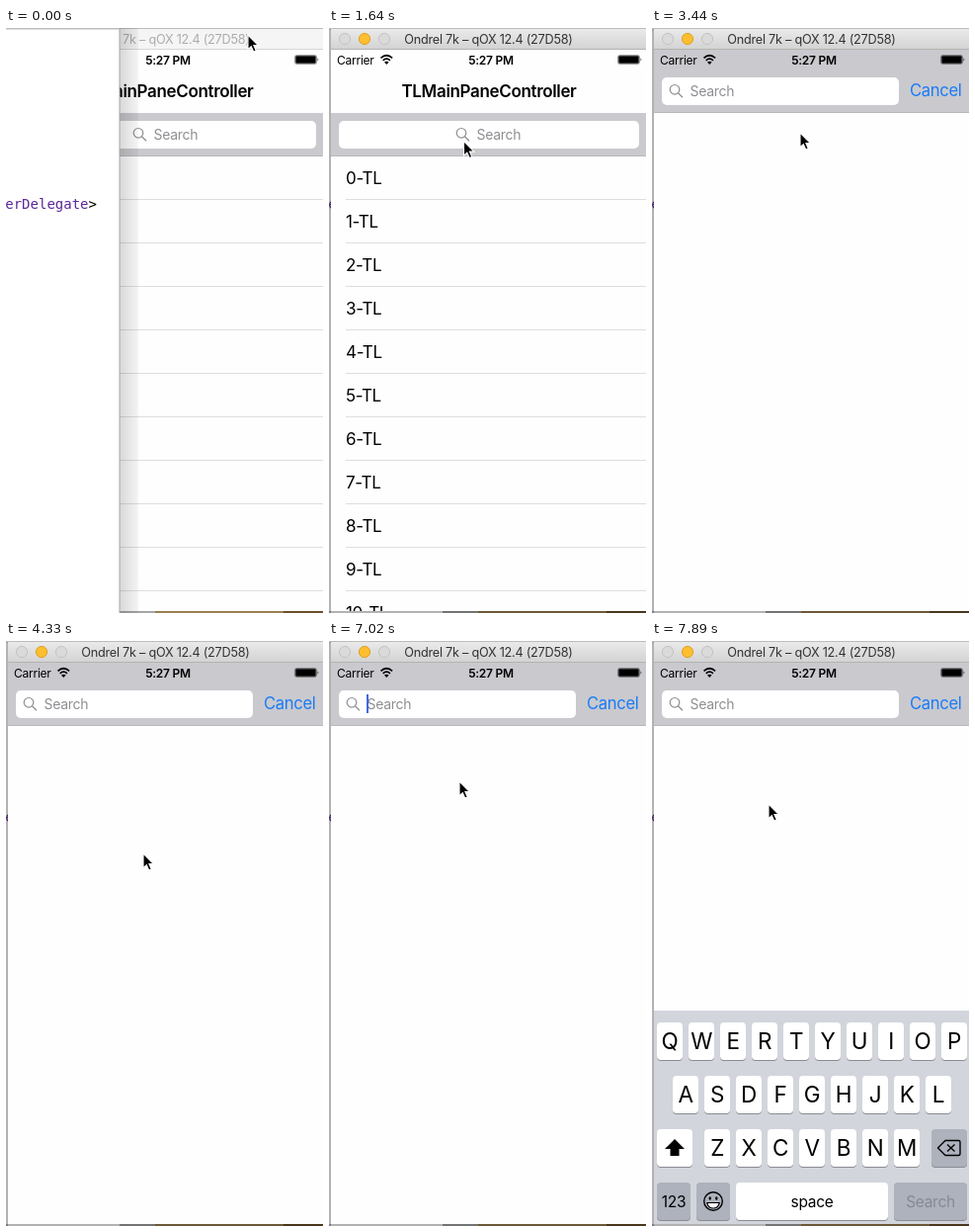
Write an HTML page that moves like this. It is 321 by 592 pixels and loops after 8 s.

```html
<!DOCTYPE html>
<html lang="en">
<head>
<meta charset="utf-8">
<title>Search bar</title>
<style>
  html, body { margin: 0; width: 100%; height: 100%; overflow: hidden; background: #fff; }
  svg { display: block; width: 321px; height: 592px; }
  text { font-family: Inter, Roboto, sans-serif; letter-spacing: -.02em; }
  .mid { text-anchor: middle; }
  .code { font: 14px "DejaVu Sans Mono", monospace; letter-spacing: 0; text-anchor: end; }
</style>
</head>
<body>
<svg viewBox="0 0 321 592" xmlns="http://www.w3.org/2000/svg">
  <defs>
    <linearGradient id="chrome" x2="0" y2="1">
      <stop stop-color="#ebebeb"/><stop offset="1" stop-color="#d2d2d2"/>
    </linearGradient>
    <linearGradient id="shade">
      <stop stop-opacity=".15"/><stop offset="1" stop-opacity=".04"/>
    </linearGradient>
    <clipPath id="screen"><rect x="2" y="22" width="319" height="568"/></clipPath>
    <g id="editor">
      <rect width="115" height="592" fill="#fff"/>
      <rect width="115" height="1.5" fill="#bdbdbd"/>
      <text class="code" x="92" y="183" fill="#5c2699">erDelegate<tspan fill="#000">&gt;</tspan></text>
    </g>
  </defs>

  <rect width="321" height="592" fill="#a6a6a6"/>
  <rect x="151" y="588" width="130" height="4" fill="#9c7f4f"/>
  <rect x="281" y="588" width="40" height="4" fill="#6a4f2c"/>
  <g id="behind">
    <use href="#editor"/>
    <rect width="2" height="592" opacity=".3"/>
    <rect y="590" width="321" height="2" opacity=".3"/>
  </g>

  <g clip-path="url(#screen)">
    <rect x="2" y="22" width="319" height="568" fill="#fefefe"/>
    <g id="list"></g>
    <text id="heading" class="mid" x="162" font-size="17" font-weight="600">TLMainPaneController</text>
    <rect id="bar" x="2" width="319" fill="#c9c9ce"/>
    <rect id="barLine" x="2" width="319" height="1" fill="#b7b7bc"/>
    <rect id="field" x="10" height="28" rx="5" fill="#fff"/>
    <g id="hint" fill="#8e8e93">
      <g fill="none" stroke="#8e8e93" stroke-width="1.2">
        <circle cx="6" cy="12.3" r="4.8"/><path d="M9.5 15.8L14 20.2"/>
      </g>
      <text x="21.5" y="19" font-size="14">Search</text>
    </g>
    <text id="cancel" x="261" y="69" font-size="16.6" fill="#1a7bf6">Cancel</text>
    <rect id="caret" x="38" y="54" width="2" height="19" fill="#4169e1"/>
    <g id="status">
      <text x="8" y="36.5" font-size="12">Carrier</text>
      <path d="M52.5 30.3Q58.3 25.2 64.1 30.3M54.7 32.8Q58.3 29.6 61.9 32.8" fill="none" stroke="#000" stroke-width="1.7"/>
      <path d="M58.3 37L56 34.6Q58.3 32.8 60.6 34.6Z"/>
      <text class="mid" x="164" y="36.5" font-size="12" font-weight="600">5:27 PM</text>
      <rect x="292.5" y="27.5" width="22" height="9" rx="2" fill="none" stroke="#000" stroke-opacity=".4"/>
      <rect x="293.3" y="28.3" width="20.4" height="7.4" rx="1"/>
      <path d="M315.6 30.3q1.5 1.7 0 3.4z"/>
    </g>
    <g id="keyboard"><rect x="2" width="319" height="216" fill="#d2d5db"/></g>
  </g>

  <rect id="titleBar" x="2" width="319" height="22"/>
  <rect id="titleEdge" x="2" y="21" width="319" height="1"/>
  <rect width="321" height="1" fill="#bcbcbc"/>
  <g stroke="#c3c3c3" fill="#dadada">
    <circle cx="16" cy="11" r="5.6"/>
    <circle cx="36" cy="11" r="5.6" fill="#fdbe2f" stroke="#dfa023"/>
    <circle cx="56" cy="11" r="5.6"/>
  </g>
  <text id="device" class="mid" x="161.5" y="15.8" font-size="12.7">Ondrel 7k – qOX 12.4 (27D58)</text>

  <g id="front">
    <use href="#editor"/>
    <rect x="115" width="19" height="592" fill="url(#shade)"/>
    <rect x="114.5" width="1" height="592" fill="#a8a8a8"/>
  </g>
  <path id="pointer" d="M0 0V14.6L3.3 11.6L5.7 17L8.2 15.9L5.9 10.6H10.4Z" stroke="#fff" stroke-width="1.1"/>
</svg>

<script>
const LOOP = 8000, TICK = 148.8;

const POINTER = [
  [6, 245, 7], [7, 243, 25], [8, 226, 110], [9, 195, 188], [10, 152, 142], [11, 136.5, 114.5],
  [18, 136.5, 114.5], [20, 152, 106], [21, 152, 106], [22, 150, 106], [23, 150, 106],
  [24, 152, 140], [26, 161, 310], [27, 156, 346], [29, 139, 215], [30, 135, 170], [31, 134, 158],
  [46, 134, 158], [47, 132, 142], [49, 113, 91], [50, 111, 88], [51, 112, 105], [53, 118, 165]
];
const CARET = [
  [0, 0], [24, 1], [27, .5], [28, 0], [30, 1], [33, .5], [34, 0], [37, 1],
  [40, .5], [41, 0], [43, .5], [44, 1], [52, .5], [53, 0]
];

const $ = id => document.getElementById(id);
const set = (id, attrs) => {
  for (const name in attrs) $(id).setAttribute(name, attrs[name]);
};
const show = (id, on) => set(id, { display: on ? "inline" : "none" });
const move = (id, x, y) => set(id, { transform: `translate(${x} ${y})` });
const mix = (a, b, p) => a + (b - a) * p;

function buildList() {
  let rows = "";
  for (let i = 0; i < 11; i++) {
    const y = 130 + 44 * i;
    rows += `<text x="17" y="${y + 28}" font-size="17">${i}-TL</text>
      <rect x="17" y="${y + 43}" width="304" height="1" fill="#dededf"/>`;
  }
  $("list").innerHTML = rows;
}

function key(x, y, width, label = "", size = 22.5, fill = "#fff", ink = "#000") {
  const base = y + 19 + size * .365;
  return `<rect x="${x}" y="${y + 1}" width="${width}" height="38" rx="4" fill="#898c91"/>
    <rect x="${x}" y="${y}" width="${width}" height="38" rx="4" fill="${fill}"/>
    <text class="mid" x="${x + width / 2}" y="${base}" font-size="${size}" fill="${ink}">${label}</text>`;
}

function buildKeyboard() {
  const grey = "#adb2bd";
  const row = (letters, x, y) => [...letters].map((c, i) => key(x + 32 * i, y, 26, c)).join("");
  $("keyboard").innerHTML += row("QWERTYUIOP", 5, 12) + row("ASDFGHJKL", 21, 66) + row("ZXCVBNM", 53, 120)
    + key(5, 120, 36) + key(283, 120, 36, "", 16, grey)
    + key(5, 174, 34, "123", 15.5, grey) + key(45, 174, 34, "", 16, grey)
    + key(85, 174, 154, "space", 15.5) + key(245, 174, 74, "Search", 15.5, grey, "#858a94")
    + `<path d="M23 130L33 140H27.5V147H18.5V140H13Z"/>
      <g fill="none" stroke="#000" stroke-width="1.4" stroke-linejoin="round">
        <path d="M289.5 139L297 131.5H310.5Q312 131.5 312 133V145Q312 146.5 310.5 146.5H297Z"/>
        <path d="M299 135.5L306.5 142.5M306.5 135.5L299 142.5"/>
        <circle cx="62" cy="193" r="9.3"/>
      </g>
      <ellipse cx="58.7" cy="190" rx="1.2" ry="1.8"/><ellipse cx="65.3" cy="190" rx="1.2" ry="1.8"/>
      <path d="M55.8 194.5H68.2Q67 200 62 200Q57 200 55.8 194.5Z" fill="#fff" stroke="#000" stroke-width="1.2"/>`;
}

function pointerAt(k) {
  const next = POINTER.findIndex(p => p[0] > k);
  if (next === 0) return POINTER[0].slice(1);
  if (next < 0) return POINTER[POINTER.length - 1].slice(1);
  const [t0, x0, y0] = POINTER[next - 1], [t1, x1, y1] = POINTER[next];
  const p = (k - t0) / (t1 - t0);
  return [mix(x0, x1, p), mix(y0, y1, p)];
}

function drawSearch(k) {
  const u = Math.min(1, Math.max(0, (k - 20.6) / 2.3));
  const p = u * u * (3 - 2 * u);
  const top = mix(86, 22, p), bottom = mix(130, 86, p);
  set("heading", { y: mix(70, 6, p), opacity: 1 - p });
  set("bar", { y: top, height: bottom - top });
  set("barLine", { y: bottom - 1 });
  set("field", { y: mix(94, 50, p), width: mix(304, 240, p) });
  move("hint", mix(128, 17, p ** .53), mix(94, 50, p));
  move("cancel", mix(64, 0, p), mix(44, 0, p));
  set("cancel", { opacity: p });
  show("list", k < 21);
}

// Critically damped spring, as the system keyboard uses.
function drawKeyboard(k) {
  const w = 18.26 * Math.max(0, k - 48.3) * TICK / 1000;
  move("keyboard", 0, 374 + 216 * (1 + w) * Math.exp(-w));
}

function drawWindows(active) {
  show("behind", active);
  show("front", !active);
  set("titleBar", { fill: active ? "url(#chrome)" : "#f5f5f5" });
  set("titleEdge", { fill: active ? "#b3b3b3" : "#d6d6d6" });
  set("device", { fill: active ? "#333" : "#acacac" });
}

function render(ms) {
  const k = Math.floor(ms / TICK);
  drawWindows(k >= 5);
  drawSearch(k);
  drawKeyboard(k);
  set("caret", { opacity: CARET.filter(c => c[0] <= k).pop()[1] });
  move("pointer", ...pointerAt(k));
}

buildList();
buildKeyboard();
const start = performance.now();
function loop() {
  render((performance.now() - start) % LOOP);
  requestAnimationFrame(loop);
}
loop();
</script>
</body>
</html>
```
